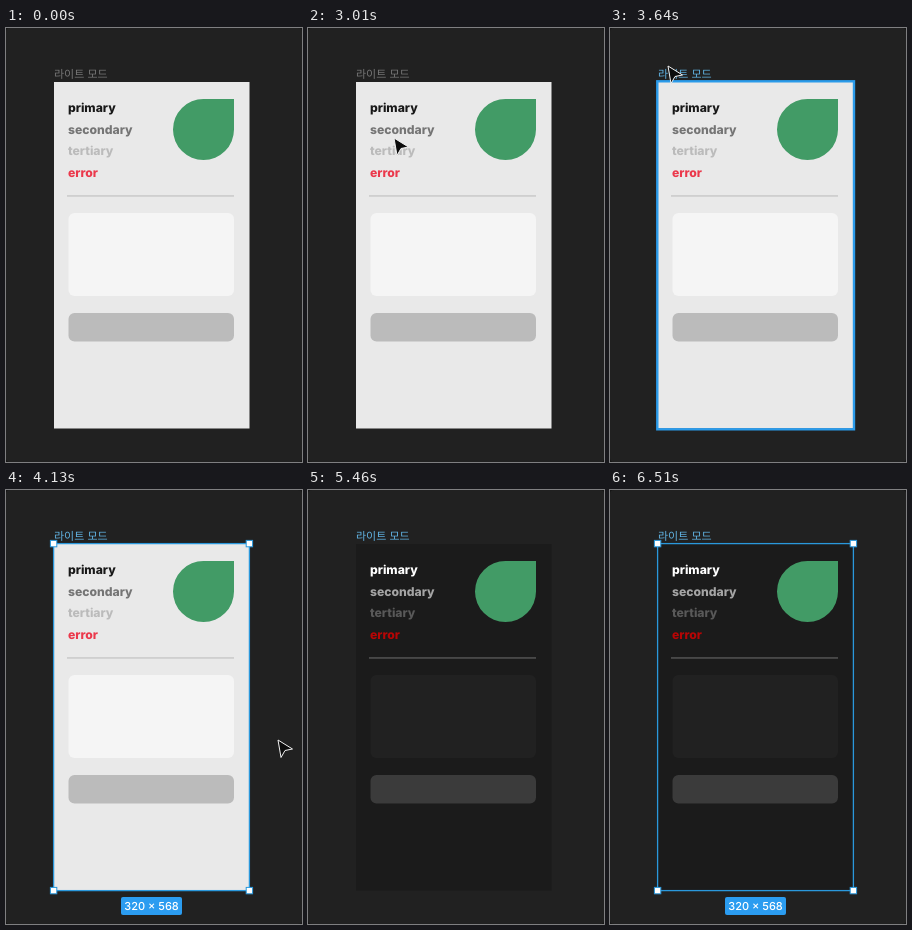
An HTML page that plays this animation: 296x434 px, repeating every 7.21 s.

```html
<!DOCTYPE html>
<html lang="ko">
<head>
<meta charset="utf-8">
<title>Light and dark mode</title>
<style>
  html, body { margin: 0; width: 100%; height: 100%; overflow: hidden; background: #151515; }
  svg { display: block; width: 296px; height: 434px; text-rendering: geometricPrecision; }
  .roles { font: 800 12.2px Inter, sans-serif; }
  .label { font: 400 11px "Noto Sans CJK KR", "Noto Sans CJK", sans-serif; }
  .size { font: 500 11px Inter, sans-serif; }

  #stage {
    --board: #e9e9e9; --card: #f5f5f5; --button: #bbb; --line: #c5c5c5;
    --primary: #181818; --secondary: #757575; --tertiary: #bbb; --error: #eb394c;
  }
  #stage.dark {
    --board: #1b1b1b; --card: #212121; --button: #3b3b3b; --line: #5c5c5c;
    --primary: #fff; --secondary: #a5a5a5; --tertiary: #595959; --error: #b60505;
  }
  #label { fill: #777; }
  #label.active { fill: #62b5e5; }
</style>
</head>
<body>
<svg id="stage" viewBox="0 0 296 434">
  <rect width="296" height="434" rx="4" fill="#212121"/>
  <text id="label" class="label" x="48" y="50">라이트 모드</text>
  <rect x="48" y="54" width="195.5" height="346.5" fill="var(--board)"/>
  <g class="roles">
    <text x="62" y="84" fill="var(--primary)">primary</text>
    <text x="62" y="105.5" fill="var(--secondary)">secondary</text>
    <text x="62" y="127" fill="var(--tertiary)">tertiary</text>
    <text x="62" y="148.5" fill="var(--error)">error</text>
  </g>
  <path d="M197.5 71H228V101.5A30.5 30.5 0 1 1 197.5 71Z" fill="#429b66"/>
  <rect x="61" y="167.3" width="167" height="1.3" fill="var(--line)"/>
  <rect x="62.5" y="185" width="165.5" height="83" rx="6" fill="var(--card)"/>
  <rect x="62.5" y="285" width="165.5" height="28.5" rx="6" fill="var(--button)"/>

  <rect id="hover" x="47.3" y="53.3" width="196.7" height="348" fill="none" stroke="#2b9bea" stroke-width="2.4"/>
  <g id="selection">
    <rect x="47.6" y="53.6" width="195.8" height="347" fill="none" stroke="#2a98dc" stroke-width="1.3"/>
    <g id="handles" fill="#fff" stroke="#2a98dc"></g>
    <rect x="115" y="407" width="61" height="18" rx="2" fill="#2b9cf0"/>
    <text class="size" x="145.5" y="420" text-anchor="middle" fill="#fff">320 × 568</text>
  </g>
  <path id="cursor" d="M0 0L14.5 9L7 10.5L3 17.5Z" fill="#0c0c0c" stroke="#f2f2f2" stroke-width="1" stroke-linejoin="round"/>
</svg>
<script>
  const LOOP = 7210, TICK = 70;
  const $ = id => document.getElementById(id);

  for (const x of [47.6, 243.4])
    for (const y of [53.6, 400.6]) {
      const box = document.createElementNS("http://www.w3.org/2000/svg", "rect");
      Object.entries({ x: x - 3.2, y: y - 3.2, width: 6.4, height: 6.4 })
        .forEach(([key, value]) => box.setAttribute(key, value));
      $("handles").append(box);
    }

  // Each path is a list of [time, x, y]; the pointer is hidden outside them.
  const paths = [
    [[3010, 86, 110], [3150, 60, 52], [3290, 42, 32], [3360, 46, 30],
     [3500, 50, 30], [3640, 58, 38], [3850, 58, 38], [4130, 272, 250], [4200, 272, 250]],
    [[6370, 230, 399], [6440, 271, 418], [6510, 271, 418]]
  ];

  const during = (t, from, to) => t >= from && t < to;

  function pointerAt(t) {
    const path = paths.find(p => during(t, p[0][0], p.at(-1)[0]));
    if (!path) return null;
    const i = path.findIndex(p => p[0] > t);
    const [t0, x0, y0] = path[i - 1], [t1, x1, y1] = path[i];
    const k = (t - t0) / (t1 - t0);
    return [x0 + (x1 - x0) * k, y0 + (y1 - y0) * k];
  }

  const show = (id, on) => $(id).setAttribute("visibility", on ? "visible" : "hidden");

  function draw(now) {
    const t = Math.floor((now % LOOP) / TICK) * TICK;
    const hover = during(t, 3150, 3290) || during(t, 3570, 3850);
    const selected = during(t, 3850, 5460) || t >= 5950;
    const point = pointerAt(t);

    $("stage").classList.toggle("dark", t >= 5460);
    $("label").classList.toggle("active", hover || t >= 3850);
    show("hover", hover);
    show("selection", selected);
    show("cursor", point);
    if (point) $("cursor").setAttribute("transform", `translate(${point})`);
  }

  const start = performance.now();
  function frame() {
    draw(performance.now() - start);
    requestAnimationFrame(frame);
  }
  frame();
</script>
</body>
</html>
```
